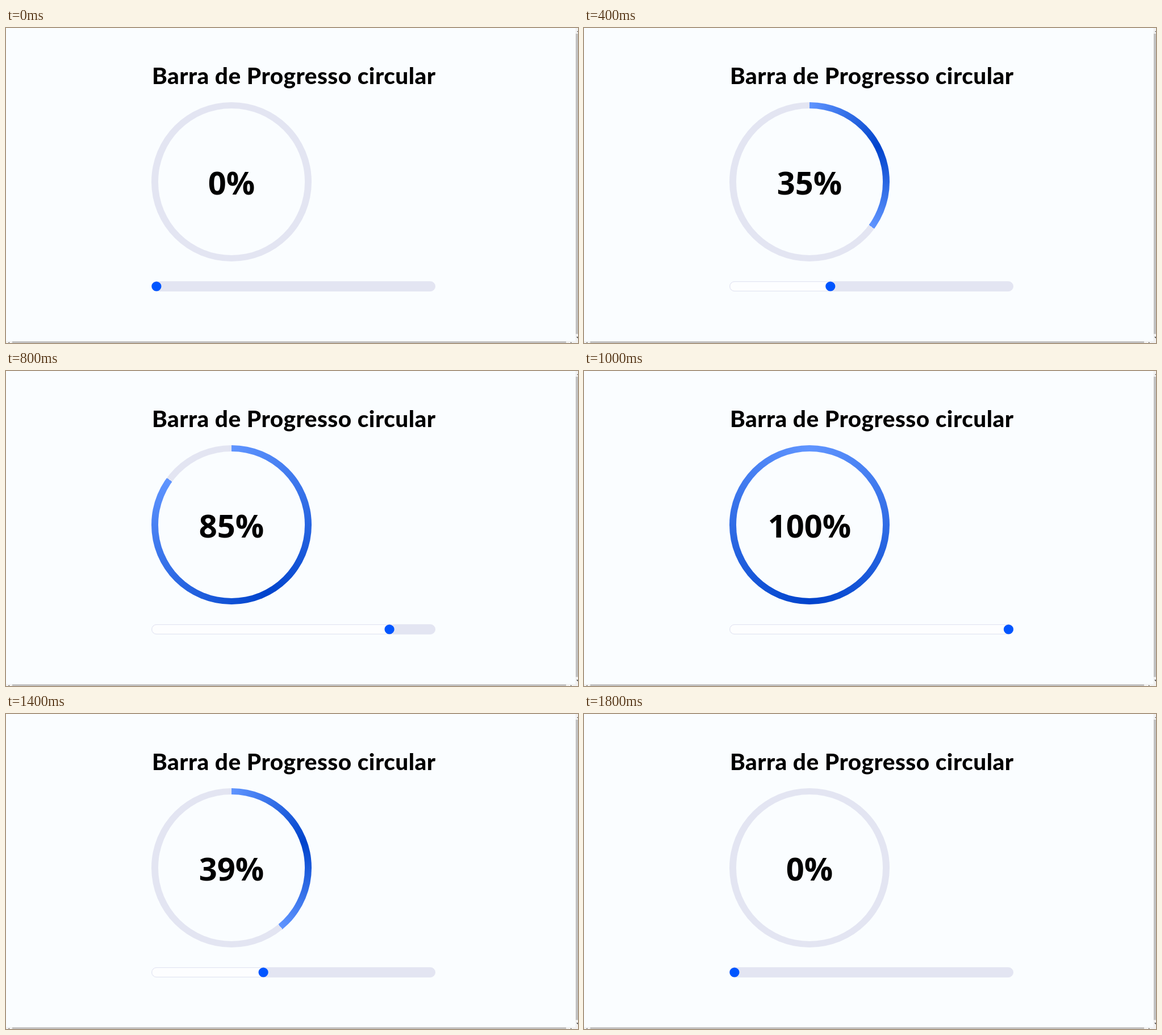
Write an HTML page that moves like this. It is 1007 px wide and 556 px high and loops after 2 s.

```html
<!DOCTYPE html>
<html lang="pt">
<head>
<meta charset="utf-8">
<title>Barra de Progresso circular</title>
<style>
  html, body { margin: 0; width: 100%; height: 100%; overflow: hidden; background: #fafdff; }
  body { --p: 0; --track: #e3e5f2; --light: #6095ff; --dark: #0043cc; position: relative; }
  div, svg { position: absolute; }
  svg { left: 0; top: 0; }
  .ring {
    left: 256.4px; top: 131.2px; width: 281.2px; height: 281.2px; border-radius: 50%;
    background: conic-gradient(var(--light) 0, var(--dark) calc(var(--p) * .5%),
      var(--light) calc(var(--p) * 1%), var(--track) calc(var(--p) * 1%));
  }
  .ring::after {
    content: ""; position: absolute; inset: 11.3px; border-radius: 50%; background: #fafdff;
  }
  .slider {
    left: 256.4px; top: 447.3px; width: 499.8px; height: 17.3px; border-radius: 9px;
    box-sizing: border-box; border: 1px solid var(--track);
    background: linear-gradient(90deg, #fdfeff calc(var(--p) * 1%), var(--track) 0) border-box;
    box-shadow: inset 0 0 0 .3px var(--track);
  }
  .thumb { fill: #0055ff; transform: translateX(calc(var(--p) * 4.825px)); }
  text { text-anchor: middle; font-weight: 700; }
  .title { font-family: Lato, sans-serif; font-size: 40.5px; font-weight: 800; letter-spacing: .5px; }
  .value { font-family: "Noto Sans", sans-serif; font-size: 56px; }
</style>
</head>
<body>
<div class="ring"></div>
<div class="slider"></div>
<svg width="1007" height="556" viewBox="0 0 1007 556">
  <circle class="thumb" cx="264.9" cy="456" r="8.6"/>
  <text class="title" x="506.7" y="98.8">Barra de Progresso circular</text>
  <text class="value" x="397" y="293.5">0%</text>
  <path fill="#f1f1f1" d="M1002.5 0h4.5v556h-4.5zM0 552.5h1007v3.5H0z"/>
  <path fill="#c1c1c1" d="M1003 10h4v530h-4zM11 553h975v3H11z"/>
  <path fill="#505050" d="M1004 545h3v3zM1005 7l2-2v2zM4 556l2-2v2zM994 554l2 2h-2z"/>
</svg>
<script>
  const levels = [0, 20, 35, 63, 85, 100, 75, 39, 17, 0];
  const stepMs = 200;
  const value = document.querySelector('.value');
  const start = performance.now();
  let shown = 0;

  function draw() {
    const step = Math.floor((performance.now() - start) / stepMs) % levels.length;
    const level = levels[step];
    if (level !== shown) {
      shown = level;
      document.body.style.setProperty('--p', level);
      value.textContent = level + '%';
    }
    requestAnimationFrame(draw);
  }
  draw();
</script>
</body>
</html>
```
